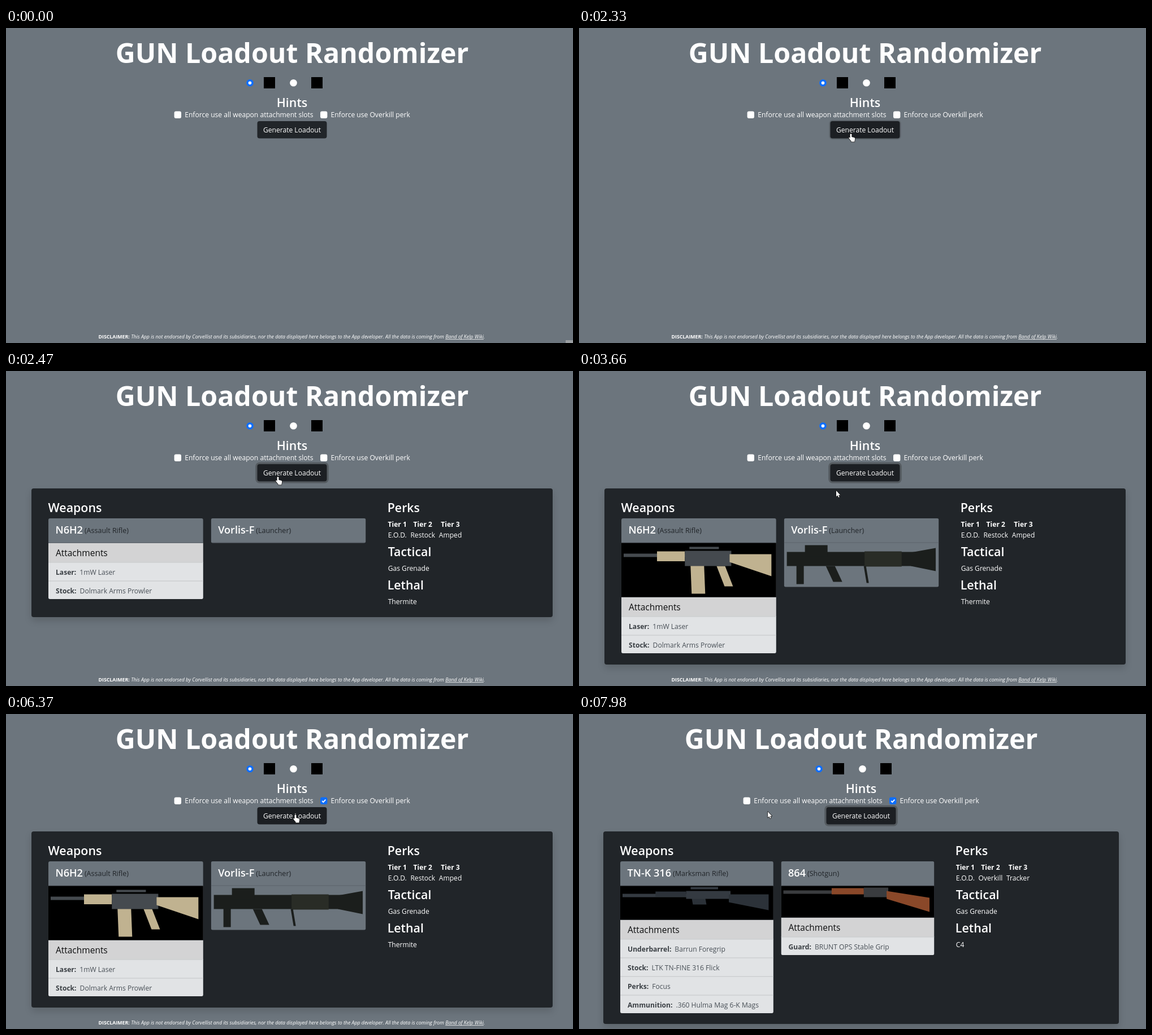
An HTML page with a canvas that plays this animation: 1003 px wide and 558 px high, repeating every 8000 ms.

```html
<!DOCTYPE html>
<html lang="en">
<head>
<meta charset="utf-8">
<title>Loadout Randomizer</title>
<style>
html, body { margin: 0; width: 100%; height: 100%; overflow: hidden; background: #6c757d; }
canvas { display: block; }
</style>
</head>
<body>
<canvas id="stage" width="1003" height="558"></canvas>
<script>
const ctx = document.getElementById('stage').getContext('2d');
const LOOP = 8000;
const GRAY = '#6c757d', DARK = '#212529', BLUE = '#0d6efd', WHITE = '#fff';
const BODY = 12.1, H3 = 21.4, H4 = 18.1, H5 = 15.5, SMALL = 8.81;
const CLICK = { first: 2230, images: 2530, check: 5480, blur: 6300, second: 6400 };

const ARROW = new Path2D('M0 0v10.5l2.4-2.2 1.7 3.7 1.6-.7-1.6-3.6h3.2z');
const HAND = new Path2D('M-1.4 1.2q1.4-2 2.8 0v4.8l4.4 1.1q1.7.5 1.5 2.5l-.8 3.4v1.6h-6v-1.5q-2.4-2.2-4.2-5.3q.1-1.8 2.3-.2z');
const ENTRY = { x: 985, y: 540 };
const MOVES = [
  { from: 70, to: 260, x: 673, y: 344 },
  { from: 600, to: 1200, x: 461, y: 179 },
  { from: 1200, to: 1400, x: 481, y: 187 },
  { from: 3655, to: 3660, x: 455, y: 212 },
  { from: 3700, to: 4410, x: 548, y: 157 },
  { from: 4480, to: 4890, x: 562, y: 154 },
  { from: 5600, to: 6230, x: 512, y: 178 },
  { from: 6620, to: 6970, x: 452, y: 200 },
  { from: 7430, to: 7560, x: 391, y: 187 },
  { from: 7830, to: 7980, x: 334, y: 173 }
];

const rifle = {
  h: 96, fill: '#000', axis: 22, guard: .23, body: .41, end: .71, depth: 27,
  mag: 50, flare: 25, drop: 0, steel: '#454a4f', wood: '#c0b290'
};
const marksman = {
  h: 60, fill: '#000', axis: 17, guard: .23, body: .43, end: .72, depth: 14,
  mag: 11, flare: 14, drop: 0, steel: '#343a41', wood: '#2c3239'
};
const shotgun = {
  h: 56, fill: '#000', axis: 11, guard: .33, body: .54, end: .7, depth: 17,
  mag: 0, flare: 11, drop: 12, steel: '#3a3c3f', wood: '#8a4829'
};
const launcher = { h: 78, tube: true, steel: '#1b1e1c', wood: '#292c26' };

const FIRST = {
  x: 45, w: 922,
  weapons: [
    { name: 'N6H2', kind: '(Assault Rifle)', art: rifle,
      parts: { Laser: '1mW Laser', Stock: 'Dolmark Arms Prowler' } },
    { name: 'Vorlis-F', kind: '(Launcher)', art: launcher, parts: {} }
  ],
  perks: ['E.O.D.', 'Restock', 'Amped'], tactical: 'Gas Grenade', lethal: 'Thermite'
};
const SECOND = {
  x: 43, w: 912,
  weapons: [
    { name: 'TN-K 316', kind: '(Marksman Rifle)', art: marksman,
      parts: { Underbarrel: 'Barrun Foregrip', Stock: 'LTK TN-FINE 316 Flick',
        Perks: 'Focus', Ammunition: '.360 Hulma Mag 6-K Mags' } },
    { name: '864', kind: '(Shotgun)', art: shotgun, parts: { Guard: 'BRUNT OPS Stable Grip' } }
  ],
  perks: ['E.O.D.', 'Overkill', 'Tracker'], tactical: 'Gas Grenade', lethal: 'C4'
};

const ramp = (t, a, b) => Math.max(0, Math.min(1, (t - a) / (b - a)));
const ease = k => k * k * (3 - 2 * k);

function box(x, y, w, h, color, r = 0) {
  ctx.fillStyle = color;
  ctx.beginPath();
  ctx.roundRect(x, y, w, h, r);
  ctx.fill();
}
function disc(x, y, r, color) {
  ctx.fillStyle = color;
  ctx.beginPath();
  ctx.arc(x, y, r, 0, Math.PI * 2);
  ctx.fill();
}
// A block whose foot leans sideways and whose right end drops and flares
function slab(color, x, y, w, h, lean = 0, drop = 0, flare = 0) {
  ctx.fillStyle = color;
  ctx.beginPath();
  ctx.moveTo(x, y);
  ctx.lineTo(x + w, y + drop);
  ctx.lineTo(x + w + lean, y + drop + h + flare);
  ctx.lineTo(x + lean, y + h);
  ctx.fill();
}
// Returns the x where the text ends
function text(str, x, y, size = BODY, style = '400', color = WHITE, align = 'left') {
  ctx.font = `${style} ${size}px "Open Sans", "Noto Sans", sans-serif`;
  ctx.textAlign = align;
  ctx.fillStyle = color;
  ctx.fillText(str, x, y);
  return x + ctx.measureText(str).width;
}

function gun(a, w) {
  const body = a.body * w, end = a.end * w, top = a.axis - 8;
  slab(a.steel, 4, a.axis - 3, body, 6);
  slab(a.wood, a.guard * w, top + 1, body - a.guard * w, a.depth * .65);
  if (a.mag) {
    slab(a.steel, body + 8, top - 7, end - body - 30, 4);
    slab(a.wood, body + 10, top + a.depth - 1, 24, a.mag, 2);
  }
  if (a.mag > a.depth) slab(a.wood, end - 26, top + a.depth, 15, 36, 14);
  slab(a.steel, body, top, end - body, a.depth);
  slab(a.wood, end - 3, top + 6, w * .98 - end, 14, 0, a.drop, a.flare);
}
function tube(a, w) {
  slab(a.steel, 5, 16, w * .84, 25);
  slab(a.wood, w * .52, 15, w * .24, 27);
  slab(a.steel, w * .82, 17, w * .16, 24, 0, -8, 17);
  slab(a.steel, 37, 4, 40, 20);
  slab(a.steel, 22, 40, 13, 33);
  slab(a.steel, 74, 41, 16, 28, 13);
  slab(a.steel, 141, 41, 4, 30, 5);
}

function pointer(t) {
  if (t < MOVES[0].from) return null;
  let { x, y } = ENTRY;
  for (const m of MOVES) {
    const k = ease(ramp(t, m.from, m.to));
    x += (m.x - x) * k;
    y += (m.y - y) * k;
  }
  return { x, y };
}

function radio(x, on) {
  disc(x, 97.3, 6.3, on ? BLUE : WHITE);
  if (on) disc(x, 97.3, 2.8, WHITE);
}
function checkbox(x, y, on, focus) {
  if (focus) box(x - 3.3, y - 3.3, 19, 19, 'rgba(13,110,253,.25)', 5);
  box(x, y, 12.4, 12.4, on ? BLUE : WHITE, 3);
  if (!on) return;
  ctx.strokeStyle = WHITE;
  ctx.lineWidth = 1.8;
  ctx.stroke(new Path2D(`M${x + 3.2} ${y + 6.4}l2.2 2.2 4-4.6`));
}

function header(t, hover, ring) {
  text('GUN Loadout Randomizer', 818.5, 62, 48.3, '700', WHITE, 'right');
  radio(431.5, true);
  box(456, 87, 20, 20, '#000');
  radio(508.5, false);
  box(540, 87, 20, 20, '#000');
  text('Hints', 506, 140, H3, '600', WHITE, 'center');
  checkbox(297.6, 147.6, false, false);
  text('Enforce use all weapon attachment slots', 316.2, 158);
  checkbox(556, 147.6, t >= CLICK.check, t >= CLICK.check && t < CLICK.blur);
  text('Enforce use Overkill perk', 574.4, 158);
  const r = ring * 3.3;
  if (r) box(444.5 - r, 165 - r, 123 + 2 * r, 30.5 + 2 * r, `rgba(66,70,73,${ring * .55})`, 4 + r);
  box(444.5, 165, 123, 30.5, hover || ring ? '#1c1f23' : DARK, 4);
  text('Generate Loadout', 506, 185, BODY, '400', WHITE, 'center');
}

function weapon({ name, kind, art, parts }, x, w, images) {
  const rows = Object.entries(parts);
  const artH = images ? art.h : 0;
  const listH = rows.length ? 33.5 + rows.length * 33 : 0;
  ctx.save();
  ctx.beginPath();
  ctx.roundRect(x, 261, w, 43.5 + artH + listH, 3);
  ctx.clip();
  box(x, 261, w, 300, GRAY);
  box(x, 303.5, w, 1, '#5d656c');
  const nameEnd = text(name, x + 12.5, 288, H4, '600');
  text(kind, nameEnd + 3, 287, 12.5, '400', DARK);
  if (images) {
    ctx.save();
    ctx.translate(x, 304.5);
    if (art.fill) box(0, 0, w, artH, art.fill);
    (art.tube ? tube : gun)(art, w);
    ctx.restore();
  }
  if (listH) {
    let y = Math.round(304.5 + artH);
    box(x, y, w, 34, '#d3d3d4');
    text('Attachments', x + 13, y + 23, H5, '500', '#0c0d0e');
    y += 33.5;
    for (const [label, value] of rows) {
      box(x, y, w, 33.5, '#e1e3e5');
      box(x, y, w, 1, '#c3c5c7');
      const labelEnd = text(label + ':', x + 13, Math.round(y + 22), BODY, '700', '#3a3f44');
      text(value, labelEnd + 6, Math.round(y + 22), BODY, '400', '#495057');
      y += 33;
    }
  }
  ctx.restore();
}

function card({ x, w, weapons, perks, tactical, lethal }, h, images) {
  ctx.save();
  ctx.shadowColor = 'rgba(0,0,0,.15)';
  ctx.shadowBlur = 13;
  ctx.shadowOffsetY = 6.5;
  box(x, 208, w, h, DARK, 4);
  ctx.restore();

  const heading = (str, hx, y) => text(str, hx, y, H3, '600');
  heading('Weapons', x + 29.5, 250);
  weapons.forEach((item, i) => weapon(item, x + 30 + i * w * .312, w * .297, images));

  const side = x + w * .684;
  heading('Perks', side - 1, 250);
  let left = side;
  perks.forEach((perk, i) => {
    const right = text(perk, left, 295);
    text('Tier ' + (i + 1), (left + right) / 2, 276, BODY, '700', WHITE, 'center');
    left = right + 6.7;
  });
  heading('Tactical', side, 328);
  text(tactical, side, 354);
  heading('Lethal', side - 1, 387);
  text(lethal, side, 413);
}

function footer() {
  const italic = 'italic 400';
  let x = text('DISCLAIMER: ', 163.5, 550, SMALL, '700');
  x = text('This App is not endorsed by Corvellist and its subsidiaries, nor the data displayed here belongs to the App developer. All the data is coming from ',
    x, 550, SMALL, italic);
  const end = text('Band of Kelp Wiki', x, 550, SMALL, italic);
  box(x, 551.3, end - x, .8, WHITE);
  text('.', end, 550, SMALL, italic);
}

function cursor({ x, y }, shape) {
  ctx.save();
  ctx.translate(x, y);
  ctx.lineJoin = 'round';
  ctx.lineWidth = 1.4;
  ctx.strokeStyle = '#111';
  ctx.stroke(shape);
  ctx.fillStyle = WHITE;
  ctx.fill(shape);
  ctx.restore();
}

function render(t) {
  box(0, 0, 1003, 558, GRAY);
  const second = t >= CLICK.second + 150;
  const shift = second ? -7 : 0;
  const pos = pointer(t);
  const hover = pos && Math.abs(pos.x - 506 - shift) < 62 && Math.abs(pos.y - 180) < 15;
  const pressed = t < CLICK.check ? CLICK.first : CLICK.second;
  const ring = ramp(t, pressed, pressed + 160);

  ctx.save();
  ctx.translate(shift, 0);
  header(t, hover, ring);
  ctx.restore();

  if (second) card(SECOND, 341, true);
  else {
    const images = t >= CLICK.images;
    if (t >= CLICK.first + 160) card(FIRST, images ? 312 : 228, images);
    footer();
  }
  if (pos) cursor(pos, hover ? HAND : ARROW);
  else box(990, 553, 13, 5, '#9b9fa2');
}

const start = performance.now();
function loop() {
  render((performance.now() - start) % LOOP);
  requestAnimationFrame(loop);
}
loop();
</script>
</body>
</html>
```
